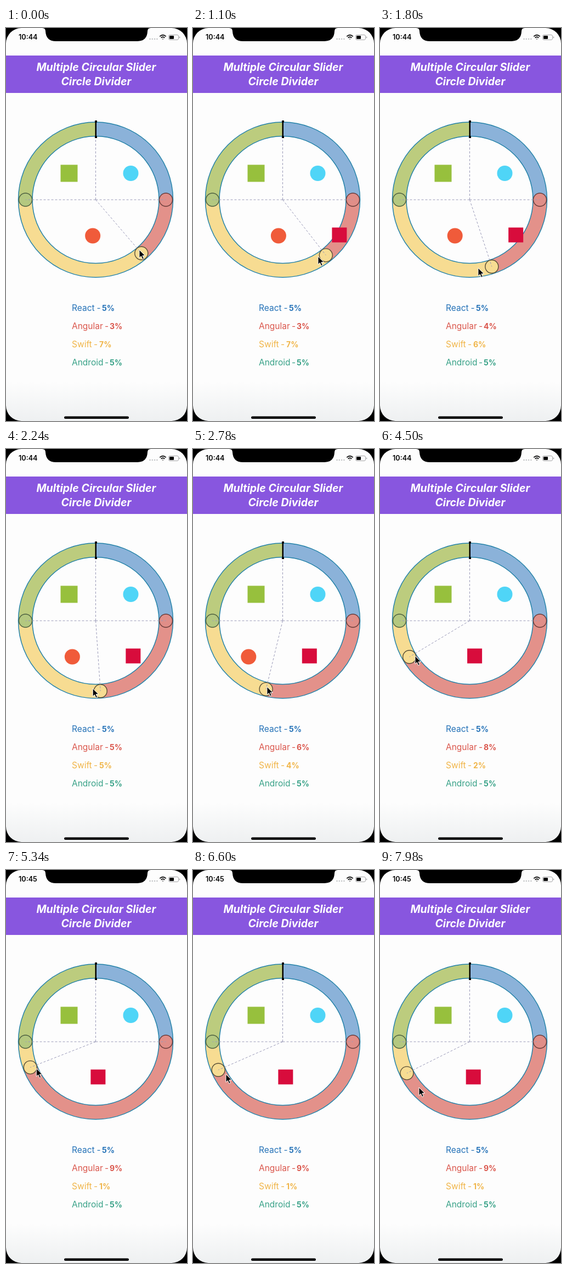
Write an HTML page that moves like this. It is 330 px wide and 714 px high and loops after 8 s.

```html
<!DOCTYPE html>
<html lang="en">
<head>
<meta charset="utf-8">
<title>Multiple Circular Slider</title>
<style>
html, body { margin: 0; width: 100%; height: 100%; overflow: hidden; background: #000; }
svg { display: block; width: 330px; height: 714px; font-family: Inter, "Open Sans", sans-serif; }
.title { font-size: 19.5px; font-weight: 700; font-style: italic; fill: #fff; text-anchor: middle; }
.legend { font-size: 15.5px; }
.legend .num { font-size: 14px; font-weight: 700; }
.edge { fill: none; stroke: #2482a8; stroke-width: 1.5; }
.band { fill: none; stroke-width: 25.5; }
.spoke { stroke: #9a9ab8; stroke-width: 1; stroke-dasharray: 4 3; }
.knob { stroke-width: 1.4; }
</style>
</head>
<body>
<svg viewBox="0 0 330 714">
  <defs>
    <linearGradient id="paper" x1="0" y1="0" x2="0" y2="1">
      <stop offset=".9" stop-color="#fdfdfd"/>
      <stop offset="1" stop-color="#eef0f1"/>
    </linearGradient>
  </defs>
  <rect width="330" height="714" rx="28" fill="url(#paper)"/>

  <path d="M66 0Q72 0 72 6Q73 24 91 24H240Q257 24 258 6Q258 0 264 0Z"/>
  <text id="clock" x="23" y="21" font-size="12.6" font-weight="600"></text>
  <g fill="#c2c4c6">
    <circle cx="262.5" cy="20" r="1.3"/><circle cx="266.8" cy="20" r="1.3"/>
    <circle cx="271.1" cy="20" r="1.3"/><circle cx="275.4" cy="20" r="1.3"/>
  </g>
  <g fill="none" stroke="#111" stroke-width="1.8">
    <path d="M280.3 15.3Q286 10.2 291.7 15.3M282.6 17.8Q286 14.8 289.4 17.8"/>
    <path d="M284.6 19.4h2.8L286 21Z" fill="#111" stroke="none"/>
  </g>
  <rect x="296.5" y="12.5" width="18" height="9" rx="2.5" fill="none" stroke="#a6a6a8"/>
  <rect x="298" y="14" width="8" height="6" rx="1"/>
  <rect x="315.8" y="15.5" width="1.4" height="3" rx=".7" fill="#a6a6a8"/>

  <rect y="50" width="330" height="68" fill="#8856df"/>
  <text class="title" x="164.5" y="78">Multiple Circular Slider</text>
  <text class="title" x="164.5" y="104">Circle Divider</text>

  <g id="ring"></g>
  <g id="legend"></g>

  <path id="cursor" d="M0 0V14.6L3.4 11.5L5.9 17.2L8.4 16.1L5.9 10.6H10.6Z" stroke="#fff" stroke-width="1"/>
  <rect x="106" y="705.5" width="118" height="4.5" rx="2.2"/>
</svg>
<script>
const LOOP = 8000, CX = 163.5, CY = 312, R = 128, STEP = 18, MIN_ICON = 50.5;
const $ = id => document.getElementById(id);

// time, handle angle in degrees clockwise from the right
const ANGLE = [[0, 49.4], [1100, 52], [1800, 71.6], [2780, 103.7], [3340, 118.5],
  [4080, 134], [4500, 149.1], [5500, 159], [6000, 159], [6600, 156.4], [7980, 153.5]];
// time, pointer tip x, y
const POINTER = [[0, 243, 403], [1100, 228, 415], [1800, 179, 436], [2780, 135, 432], [3340, 107, 422],
  [4080, 76, 399], [4500, 64, 376], [5500, 55, 360], [6000, 55, 363], [6600, 60, 371], [7980, 71, 395]];

// Smooth curve through the keys; it never overshoots them.
function at(track, t) {
  const i = track.findIndex(k => k[0] > t);
  if (i < 0) return track[track.length - 1].slice(1);
  const a = track[i - 1], b = track[i], h = b[0] - a[0], u = (t - a[0]) / h;
  const rate = (j, n) => track[j] && track[j + 1]
    ? (track[j + 1][n] - track[j][n]) / (track[j + 1][0] - track[j][0]) : 0;
  const slope = (j, n) => {
    const p = rate(j - 1, n), q = rate(j, n);
    return p * q > 0 ? 2 * p * q / (p + q) : 0;
  };
  return a.slice(1).map((v, k) => {
    const n = k + 1, w = u * u * (3 - 2 * u);
    return v + (b[n] - v) * w
      + h * u * (1 - u) * ((1 - u) * slope(i - 1, n) - u * slope(i, n));
  });
}

function set(el, attrs) {
  for (const k in attrs) el.setAttribute(k, attrs[k]);
}
function add(parent, tag, attrs, text) {
  const el = document.createElementNS("http://www.w3.org/2000/svg", tag);
  set(el, attrs);
  if (text) el.textContent = text;
  parent.appendChild(el);
  return el;
}

const rad = a => a * Math.PI / 180;
const point = a => [CX + R * Math.cos(rad(a)), CY + R * Math.sin(rad(a))];
const arc = (a, b) => `M${point(a)}A${R} ${R} 0 0 1 ${point(b)}`;

const ring = $("ring");
const band = (color, a, b) => add(ring, "path", { class: "band", stroke: color, d: arc(a, b) });
const knob = (fill, stroke, a) => {
  const [cx, cy] = point(a);
  return add(ring, "circle", { class: "knob", cx, cy, r: 12, fill, stroke });
};
const spoke = a => {
  const [x2, y2] = point(a);
  return add(ring, "line", { class: "spoke", x1: CX, y1: CY, x2, y2 });
};
const square = (x, y, s, fill) =>
  add(ring, "rect", { x: x - s / 2, y: y - s / 2, width: s, height: s, fill });

band("#8bb2d9", -90, 0);
const angularBand = band("#e3918a", 0, 90);
const swiftBand = band("#f7dc92", 90, 180);
band("#bccc7e", 180, 270);
for (const r of [141, 115.5]) add(ring, "circle", { class: "edge", cx: CX, cy: CY, r });

knob("#e08e88", "#693c3a", 0);
knob("#b4c880", "#4d6040", 180);
const handle = knob("#f7dc92", "#574d36", 90);
spoke(0);
spoke(180);
add(ring, "line", { class: "spoke", x1: CX, y1: CY, x2: CX, y2: 199 });
const handleSpoke = spoke(90);
add(ring, "path", { d: "M162 168h4v3.5h-1v25h1v3.5h-4v-3.5h.5v-25h-.5Z" });

add(ring, "circle", { cx: 227.5, cy: 264, r: 14, fill: "#4fd5f7" });
square(115, 264, 31, "#97c03d");
const angularIcon = square(0, 376, 27, "#d80c3c");
const swiftIcon = add(ring, "circle", { cy: 377.5, r: 14, fill: "#f05b3a" });

// label, colour, dash x, number x
const values = [["React", "#2673b8", 165.5, 175], ["Angular", "#da564c", 180, 189],
  ["Swift", "#f0b548", 160, 170], ["Android", "#37a187", 180, 189]
].map(([name, fill, dash, num], i) => {
  const y = 514 + 33 * i;
  const row = add($("legend"), "g", { class: "legend", fill });
  add(row, "text", { x: 120, y }, name);
  add(row, "text", { x: dash, y }, "-");
  return add(row, "text", { class: "num", x: num, y: y - 0.5 }, "5%");
});

function draw(t) {
  const [a] = at(ANGLE, t), [px, py] = at(POINTER, t), [x, y] = point(a);
  set(angularBand, { d: arc(0, a) });
  set(swiftBand, { d: arc(a, 180) });
  set(handle, { cx: x, cy: y });
  set(handleSpoke, { x2: x, y2: y });

  const shift = mid => R * Math.cos(rad(mid)) ** 2;
  set(angularIcon, { x: CX + shift(a / 2) - 13.5, visibility: a > MIN_ICON ? "visible" : "hidden" });
  set(swiftIcon, { cx: CX + 17 - shift((a + 180) / 2), visibility: 180 - a > MIN_ICON ? "visible" : "hidden" });

  const angular = Math.round(a / STEP);
  values[1].textContent = angular + "%";
  values[2].textContent = 10 - angular + "%";
  $("clock").textContent = t < 4700 ? "10:44" : "10:45";
  set($("cursor"), { transform: `translate(${px} ${py})` });
}

function tick() {
  draw(performance.now() % LOOP);
  requestAnimationFrame(tick);
}
tick();
</script>
</body>
</html>
```
